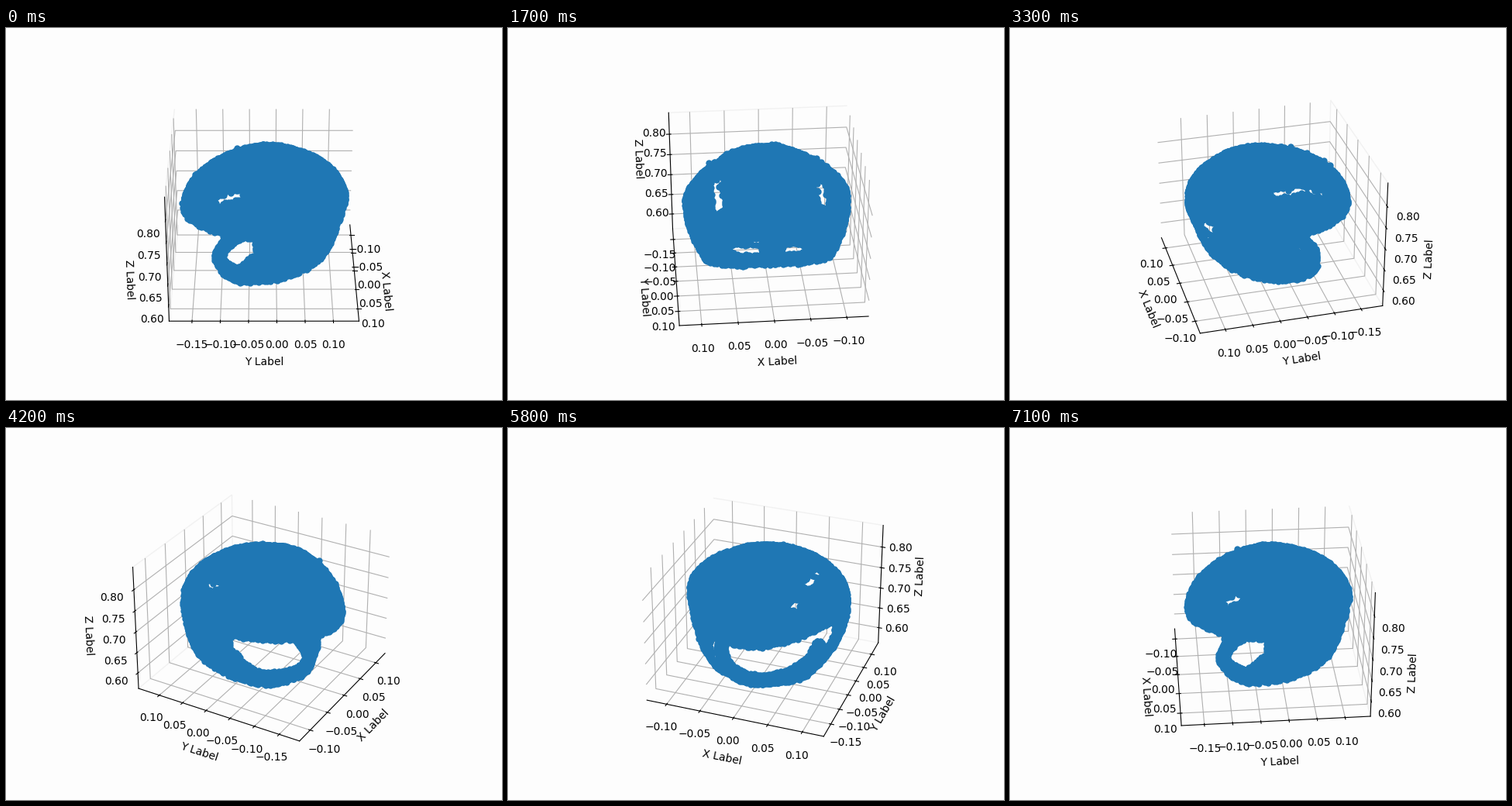
Write a matplotlib script that moves like this. It is 640 px wide and 480 px high and loops after 7200 ms.

```python
import numpy as np
import matplotlib.pyplot as plt
from matplotlib.animation import FuncAnimation

BG = "#fdfdfd"
BLUE = "#1f77b4"
FRAMES, STEP = 72, 5

X_LIM, Y_LIM, Z_LIM = (-0.130, 0.1305), (-0.1905, 0.1453), (0.5615, 0.852)
BOX = (1.19, 1.19, 0.8932)  # box size in the units the model is built in

rng = np.random.default_rng(4)


def bottom(y):
    """Height of the lower rim, rising towards the back."""
    return -0.30 + np.where(y > 0, 0.37, 0.15) * y


def bend(x, y, z):
    """Narrow the front of the shell and lower its brim."""
    front = np.maximum(0, -y)
    drop = 0.12 * (1 - np.clip((z - 0.1) / 0.28, 0, 1))
    return x * (1 - 0.45 * front), y, z - drop * front


def in_seam(phi, half_width):
    """Broken arcs around the back where the shell has thin gaps."""
    deg = np.degrees(phi) % 360
    return (np.abs(deg - 90) < half_width) & (np.cos(8 * phi) < 0.3)


def dome(n=5200):
    i = np.arange(n) + 0.5
    up = 1 - i / n
    phi = i * np.pi * (3 - np.sqrt(5))
    rad = 0.519 * np.sqrt(1 - up ** 2)
    x, y, z = rad * np.cos(phi), rad * np.sin(phi), 0.1 + 0.28 * up

    half = np.where(y > 0.09, 0.034, 0.026)
    slit = (np.abs(np.abs(x) - 0.325) < half) & (y > -0.3) & (y < 0.34)
    slit &= rng.random(n) > 0.05
    keep = ~slit & ~((z < 0.135) & in_seam(phi, 40))

    # a few raised points roughen the front
    raised = (rng.random(n) < 0.02) & (y < -0.15) & (z > 0.15)
    z = z + 0.022 * raised
    return bend(x[keep], y[keep], z[keep])


def body():
    phi, s = np.meshgrid(np.linspace(0, 2 * np.pi, 185, endpoint=False),
                         np.arange(0, 0.46, 0.0175))
    phi, s = phi.ravel(), s.ravel()
    power = 2 + 2 * s
    rx = 0.519 - 0.9 * s ** 2
    ry = 0.519 - np.where(np.sin(phi) > 0, 0.36, 0.55) * s
    rad = (np.abs(np.cos(phi) / rx) ** power
           + np.abs(np.sin(phi) / ry) ** power) ** (-1 / power)
    x, y, z = bend(rad * np.cos(phi), rad * np.sin(phi), 0.1 - s)
    keep = (z > bottom(y)) & (y > -0.06 + 0.67 * np.minimum(z, 0))
    keep &= ~((z > 0.06) & in_seam(phi, 40))
    keep &= ~((np.abs(z) < 0.033) & in_seam(phi, 30))
    return x[keep], y[keep], z[keep]


def chin_bar():
    t, a = np.meshgrid(np.linspace(-np.pi / 2, np.pi / 2, 95),
                       np.linspace(0, 2 * np.pi, 9, endpoint=False))
    t, a = t.ravel(), a.ravel()
    side = 0.026 * np.cos(a)
    x = (0.325 + side) * np.sin(t)
    y = 0.12 - (0.415 + side) * np.cos(t)
    return x, y, bottom(y) + 0.01 + 0.03 * np.sin(a)


def to_data(values, lim, size):
    return sum(lim) / 2 + values * (lim[1] - lim[0]) / size


model = np.hstack([dome(), body(), chin_bar()])
model += rng.normal(0, 0.003, model.shape)
cloud = [to_data(v, lim, size)
         for v, lim, size in zip(model, (X_LIM, Y_LIM, Z_LIM), BOX)]

fig = plt.figure(figsize=(6.4, 4.8), dpi=100, facecolor=BG)
ax = fig.add_subplot(projection="3d", facecolor=BG)
ax.plot(*cloud, "o", color=BLUE, ms=20 ** 0.5, mew=1.5)

ax.set(xlim=X_LIM, ylim=Y_LIM, zlim=Z_LIM,
       xlabel="X Label", ylabel="Y Label", zlabel="Z Label",
       xticks=np.arange(-2, 3) * 0.05,
       yticks=np.arange(-3, 3) * 0.05,
       zticks=np.arange(12, 17) * 0.05)

for axis, edge in ((ax.xaxis, (1, 1, 1, 0)),
                   (ax.yaxis, (0.9, 0.9, 0.9, 0.5)),
                   (ax.zaxis, (1, 1, 1, 0))):
    axis.set_pane_color(edge)
    axis.pane.set_fill(False)


def update(i):
    azim = i * STEP
    # a tiny turn settles which walls are at the back in head-on views
    nudge = 1e-3 * np.sin(np.radians(45 - azim))
    ax.view_init(elev=30, azim=azim + nudge)
    return []


anim = FuncAnimation(fig, update, frames=FRAMES, interval=100,
                     repeat=True, repeat_delay=0, blit=False)
plt.show()
```
